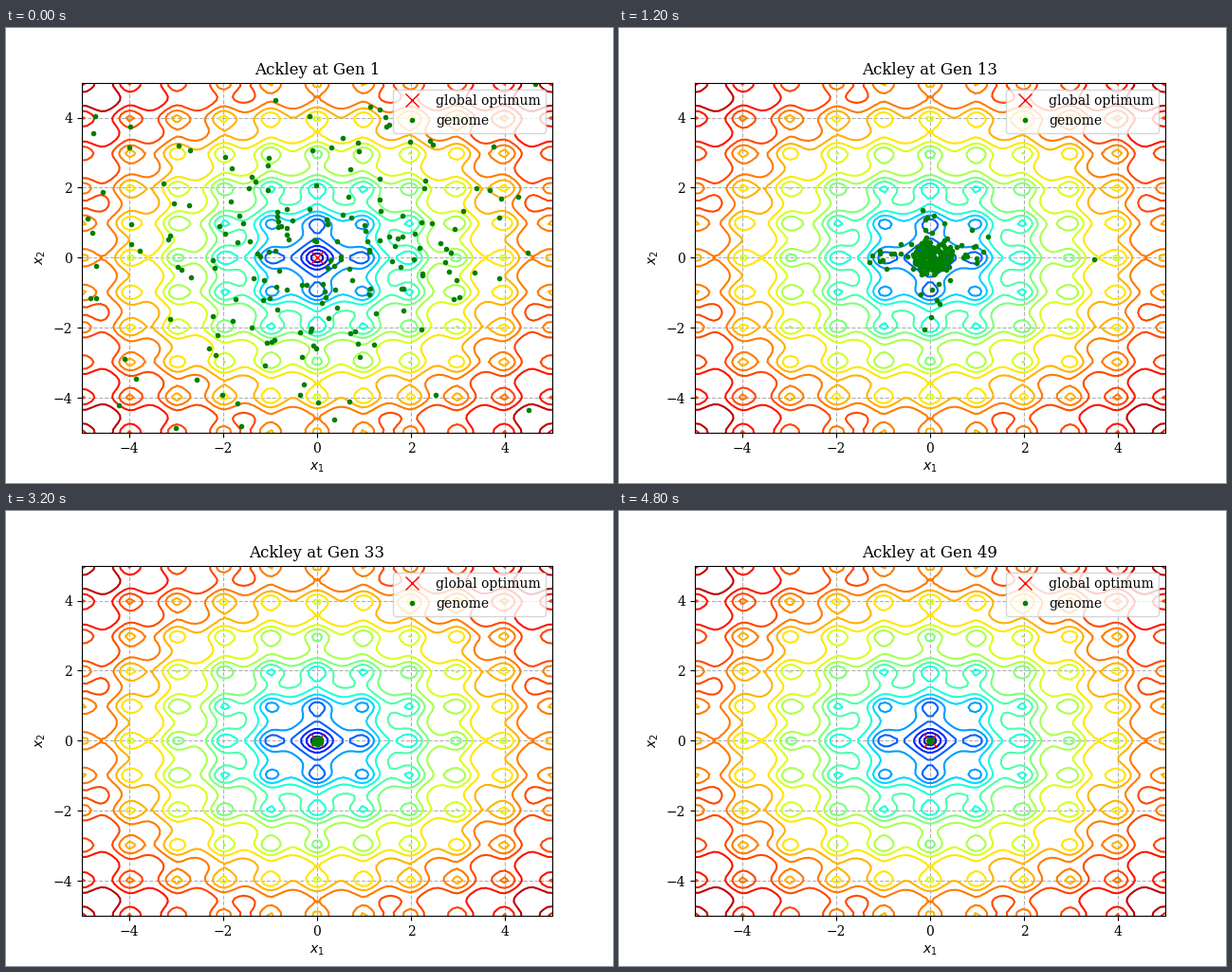
These frames come from a looping animation (640 by 480 pixels, 4900 ms). A matplotlib script:

```python
import numpy as np
import matplotlib.pyplot as plt
from matplotlib.animation import FuncAnimation

plt.rcParams["font.family"] = "DejaVu Serif"

GENS = 49
POP = 195
BOUND = 5


def ackley(x, y):
    bowl = -20 * np.exp(-0.2 * np.sqrt((x**2 + y**2) / 2))
    waves = -np.exp((np.cos(2 * np.pi * x) + np.cos(2 * np.pi * y)) / 2)
    return bowl + waves + 20 + np.e


def population(gen):
    """Genomes settle in the wells of the function, then in the central one."""
    rng = np.random.default_rng(100 + gen)
    reach = 1.8 * np.exp(-(gen - 1) / 6.3)
    jitter = min(0.3, 0.14 * np.exp(-(gen - 18) / 10))
    wells = np.round(reach * rng.standard_t(5, (POP, 2)))
    points = 0.96 * wells + rng.normal(0, jitter, (POP, 2))
    return (points + BOUND) % (2 * BOUND) - BOUND


fig, ax = plt.subplots(figsize=(6.4, 4.8), dpi=100)
axis = np.linspace(-BOUND, BOUND, 100)
X, Y = np.meshgrid(axis, axis)
ax.contour(X, Y, ackley(X, Y), levels=np.arange(19) * 0.8, cmap="jet",
           vmin=0, vmax=14.4)
ax.plot(0, 0, "rx", markersize=10, label="global optimum")
genomes, = ax.plot([], [], "g.", label="genome")
ax.set(xlim=(-BOUND, BOUND), ylim=(-BOUND, BOUND),
       xlabel="$x_1$", ylabel="$x_2$")
ax.grid(linestyle="--")
ax.legend(loc="upper right")
title = ax.set_title("")


def update(frame):
    gen = frame + 1
    genomes.set_data(*population(gen).T)
    title.set_text(f"Ackley at Gen {gen}")
    return genomes, title


anim = FuncAnimation(fig, update, frames=GENS, interval=100, repeat=True,
                     repeat_delay=0)
plt.show()
```
